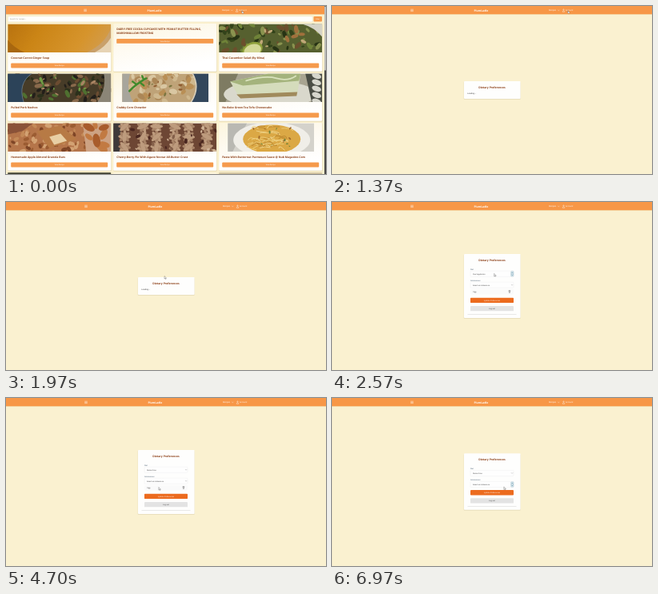
An HTML page for the animation above (8 s loop, 400 by 210 pixels).

```html
<!DOCTYPE html>
<html lang="en">
<head>
<meta charset="utf-8">
<title>Recipe preferences</title>
<style>
html, body { margin: 0; width: 100%; height: 100%; overflow: hidden; background: #faf1d0; }
svg { display: block; }
#stage { width: 100vw; height: 100vh; }
text { font-family: "Noto Sans", "Open Sans", sans-serif; text-rendering: geometricPrecision; }
</style>
</head>
<body>
<svg id="stage" viewBox="0 0 400 210">
  <defs>
    <linearGradient id="card" x1="0" y1="0" x2="0.4" y2="1">
      <stop offset="0" stop-color="#fcf5dd"/><stop offset="0.45" stop-color="#fefaf0"/>
      <stop offset="1" stop-color="#ffffff"/>
    </linearGradient>
    <linearGradient id="soup" x1="0" y1="0" x2="1" y2="0.2">
      <stop offset="0" stop-color="#b8720f"/><stop offset="0.35" stop-color="#cb8516"/>
      <stop offset="0.8" stop-color="#d6942c"/><stop offset="1" stop-color="#d39a45"/>
    </linearGradient>
  </defs>
</svg>
<script>
const LOOP = 8000;
const stage = document.getElementById("stage");

function add(parent, tag, attrs) {
  const node = document.createElementNS("http://www.w3.org/2000/svg", tag);
  for (const k in attrs) node.setAttribute(k, attrs[k]);
  parent.appendChild(node);
  return node;
}
const group = parent => add(parent, "g", {});
const rect = (p, x, y, width, height, fill, rx = 0, more = {}) =>
  add(p, "rect", { x, y, width, height, fill, rx, ...more });
const path = (p, d, stroke, width = 0.4, fill = "none") =>
  add(p, "path", { d, stroke, fill, "stroke-width": width, "stroke-linecap": "round", "stroke-linejoin": "round" });
const shape = (p, d, fill) => path(p, d, "none", 0, fill);
const oval = (p, cx, cy, rx, ry, fill, turn = 0) =>
  add(p, "ellipse", { cx, cy, rx, ry, fill, transform: `rotate(${turn} ${cx} ${cy})` });
function label(p, str, x, y, size, fill, weight = 400, anchor = "start") {
  const t = add(p, "text", { x, y, fill, "font-size": size, "font-weight": weight, "text-anchor": anchor });
  t.textContent = str;
  return t;
}
const show = (node, on) => node.setAttribute("visibility", on ? "inherit" : "hidden");
const move = (node, x, y) => node.setAttribute("transform", `translate(${x} ${y})`);

function random(seed) {
  return () => (seed = (seed * 16807) % 2147483647) / 2147483647;
}

// Loose ovals in a few tones inside the area [x, y, w, h].
function scatter(p, seed, count, tones, size, [x, y, w, h], flat = 0.5) {
  const rnd = random(seed * 7919);
  for (let i = 0; i < count; i++) {
    const r = size * (0.5 + rnd());
    oval(p, x + rnd() * w, y + rnd() * h, r, r * flat, tones[i % tones.length], rnd() * 180);
  }
}

const photos = {
  soup(p) {
    rect(p, 0, 0, 129, 36, "url(#soup)");
    shape(p, "M129 5Q122 25 98 36H129Z", "#c9a06a");
    shape(p, "M129 17Q122 29 108 36H129Z", "#e6d3b4");
    shape(p, "M0 20Q8 30 22 36H0Z", "#a8670f");
  },
  salad(p) {
    rect(p, 0, 0, 129, 36, "#56602f");
    scatter(p, 11, 70, ["#33431a", "#6f8338", "#273314", "#8a934f", "#6b4f2c"], 4, [0, 0, 129, 36]);
    scatter(p, 23, 9, ["#c0a878", "#a0703c"], 4, [50, 4, 62, 26]);
    shape(p, "M104 0H129V16Q119 4 104 0Z", "#d5d3c6");
    oval(p, 42, 32, 13, 9, "#8fa03c", -20);
    oval(p, 42, 33, 11, 7.5, "#d3d796", -20);
  },
  nachos(p) {
    rect(p, 0, 0, 129, 36, "#473c28");
    scatter(p, 5, 90, ["#2b301b", "#6b4c31", "#4f7030", "#231f1a", "#8a6a4c"], 3.4, [0, 0, 129, 36]);
    scatter(p, 17, 16, ["#6f9c45", "#a98563"], 2.6, [28, 2, 84, 30]);
    shape(p, "M0 0H30Q12 12 20 36H0Z", "#2c4359");
    path(p, "M30 0Q12 12 20 36", "#6a7f8c", 0.8);
    shape(p, "M120 0H129V36H112Q124 18 120 0Z", "#8b8577");
  },
  chowder(p) {
    rect(p, 0, 0, 108, 36, "#bfa378");
    scatter(p, 8, 50, ["#cfb88e", "#ab8656", "#d9c7a2", "#b98f55"], 4, [12, 0, 78, 36], 0.65);
    scatter(p, 31, 12, ["#8f5c30", "#7b7540"], 2, [30, 6, 52, 26]);
    shape(p, "M0 0H10Q4 18 14 36H0Z", "#a8a59c");
    shape(p, "M88 0H108V36H86Q98 18 88 0Z", "#33475c");
    path(p, "M88 0Q98 18 86 36", "#d9cfba", 1.6);
    path(p, "M9 22Q16 14 30 6M17 13l-4 -3M22 11l5 4M27 8l-2 -5", "#3f8a2c", 2.4);
  },
  cheesecake(p) {
    rect(p, 0, 0, 129, 36, "#a8a491");
    shape(p, "M0 0H24L8 36H0Z", "#7e7b62");
    oval(p, 64, 26, 58, 17, "#d9d8cc");
    shape(p, "M14 10L62 0H102L98 25L24 27Z", "#d5dcbc");
    shape(p, "M14 10L62 0H102L100 9L30 15Z", "#a4b37c");
    shape(p, "M22 26L98 23L97 28L27 31Z", "#a08a5c");
    path(p, "M34 9Q58 2 72 6T96 3", "#d9e2bd", 1.8);
    shape(p, "M108 0H129V36H116Z", "#4a4d45");
    for (let i = 0; i < 5; i++) oval(p, 122, 3 + i * 8, 6, 3.4, "#d6d6cd", 20);
  },
  granola(p) {
    rect(p, 0, 0, 129, 36, "#b5754a");
    scatter(p, 13, 90, ["#9b5c32", "#c48a58", "#7e4526", "#d3a273"], 3, [0, 0, 100, 36], 0.6);
    shape(p, "M0 0H32L18 10L0 14Z", "#8a5238");
    shape(p, "M36 10L66 3L86 20L52 31Z", "#b77a45");
    shape(p, "M52 17L66 13L74 22L58 27Z", "#e8cfa4");
    shape(p, "M94 0H129V36H98Z", "#cda283");
    scatter(p, 19, 10, ["#a85c2c", "#c27a42"], 6, [92, 2, 34, 32], 0.55);
  },
  pie(p) {
    rect(p, 0, 0, 129, 36, "#6d4634");
    shape(p, "M0 0H16Q2 16 10 36H0Z", "#3e3a3a");
    for (let i = 0; i < 18; i++) {
      const x = 14 + (i % 6) * 20 + (i % 2) * 3, y = 4 + Math.floor(i / 6) * 13;
      for (let k = 0; k < 4; k++) oval(p, x, y, 8, 2.6, k % 2 ? "#bd9b7d" : "#a88468", k * 45 + i * 23);
    }
    scatter(p, 9, 26, ["#4a2720", "#84604a", "#d0b498"], 2.4, [8, 0, 121, 36], 0.6);
  },
  pasta(p) {
    rect(p, 0, 0, 108, 36, "#d4d2cb");
    shape(p, "M0 0H24L6 36H0Z", "#b9b8b2");
    oval(p, 55, 21, 48, 22, "#f0eee8");
    oval(p, 55, 20, 36, 18, "#dba845");
    const rnd = random(7777);
    for (let i = 0; i < 46; i++) {
      const x = 24 + rnd() * 46, y = 5 + rnd() * 27;
      path(p, `M${x} ${y}q${rnd() * 10} ${rnd() * 10 - 8} ${6 + rnd() * 8} ${rnd() * 6 - 3}`,
        ["#eccb76", "#bf8a30", "#f0d58c"][i % 3], 1);
    }
    scatter(p, 3, 16, ["#6f8238", "#a06a2a"], 1.5, [30, 5, 50, 26]);
  }
};

const BROWN = "#8b3d14", ORANGE = "#f59a4c";

// ---- recipe list ----
const list = group(stage);
rect(list, 0, 0, 400, 210, "#faf0cd");
rect(list, 2.5, 13, 380.5, 6.8, "#fffefa", 1, { stroke: "#e6dfca", "stroke-width": 0.3 });
label(list, "Search for recipes...", 5, 17.2, 2.2, "#8d8a84");
rect(list, 384.5, 13, 10.5, 6.4, ORANGE, 1);
label(list, "Filter", 389.7, 17, 2.1, "#fff", 400, "middle");

// title, photo, photo offset, photo width
const cards = [
  ["Coconut Carrot-Ginger Soup", "soup", 0, 129],
  ["DAIRY-FREE COCOA CUPCAKES WITH PEANUT BUTTER FILLING,|MARSHMALLOW FROSTING"],
  ["Thai Cucumber Salad (By Mina)", "salad", 0, 129],
  ["Pulled Pork Nachos", "nachos", 0, 129],
  ["Crabby Corn Chowder", "chowder", 11, 108],
  ["No-Bake Green Tea Tofu Cheesecake", "cheesecake", 0, 129],
  ["Homemade Apple Almond Granola Bars", "granola", 0, 129],
  ["Cherry-Berry Pie With Agave Nectar All-Butter Crust", "pie", 0, 129],
  ["Pasta With Butternut Parmesan Sauce @ Nub Magazine.Com", "pasta", 11, 108]
];
cards.forEach(([title, photo, dx, w], i) => {
  const x = 2.2 + (i % 3) * 132, y = 22 + Math.floor(i / 3) * 62;
  rect(list, x + 0.2, y + 0.6, 129.2, 60, "#e3d6ae", 1.2);
  rect(list, x, y, 129, 59.8, "url(#card)", 1.2);
  if (photo) photos[photo](add(list, "svg", { x: x + dx, y: y + 0.4, width: w, height: 35.6, overflow: "hidden" }));
  const top = photo ? y + 44 : y + 7.7;
  const lines = title.split("|");
  lines.forEach((s, n) => label(list, s, x + 4, top + n * 5.5, 3.45, BROWN, 700));
  const by = photo ? y + 49.6 : y + 19;
  rect(list, x + 4, by, 121, 5.8, ORANGE, 0.9);
  label(list, "View Recipe", x + 64.5, by + 3.7, 2.15, "#fff", 500, "middle");
});
["#3f4030", "#fcf5dd", "#cdbf9c"].forEach((c, i) => rect(list, 2.2 + i * 132, 208.3, 129, 2, c, 0.5));

// ---- preferences page ----
const page = group(stage);
rect(page, 0, 0, 400, 210, "#faf1d0");

function panel(p, y, h) {
  rect(p, 164.6, y + 0.7, 71.2, h + 0.3, "#e9dfbd", 1.2);
  rect(p, 165, y, 70.6, h, "#fefefd", 1);
}
const heading = (p, y) => label(p, "Dietary Preferences", 200, y, 3.4, BROWN, 700, "middle");

const loading = group(page);
panel(loading, 94, 22);
heading(loading, 102.5);
label(loading, "Loading...", 169.3, 110.4, 2.3, "#222");

function selectBox(p, y, value) {
  rect(p, 173, y - 3.6, 54, 7.2, "#fefefe", 0.8, { stroke: "#ebebeb", "stroke-width": 0.35 });
  const text = label(p, value, 176, y + 0.8, 2.15, "#333");
  const arrow = path(p, `M224.3 ${y - 0.4}l0.8 0.8l0.8 -0.8`, "#666", 0.3);
  const spin = group(p);
  rect(spin, 223.7, y - 3.2, 3.2, 6.4, "#d8e6ec", 0.5, { stroke: "#7fa9bb", "stroke-width": 0.3 });
  path(spin, `M224.5 ${y - 0.9}l0.8 -0.9l0.8 0.9M224.5 ${y + 0.9}l0.8 0.9l0.8 -0.9`, "#35748e", 0.45);
  return { text, hover(on) { show(arrow, !on); show(spin, on); } };
}

function buildForm(withItem) {
  const g = group(page);
  const y = withItem ? 65 : 69.2;
  const drop = withItem ? 54.7 : 45.8;
  panel(g, y, withItem ? 80 : 70.6);
  heading(g, y + 8.7);
  label(g, "Diet", 173, y + 20, 2.15, "#3d5468", 500);
  const diet = selectBox(g, y + 24.8, "Ovo Vegetarian");
  label(g, "Intolerances", 173, y + 33.8, 2.15, "#3d5468", 500);
  const food = selectBox(g, y + 38.8, "Select an intolerance");
  if (withItem) {
    rect(g, 173, y + 44.2, 54, 6.4, "#fafafa", 0.7);
    label(g, "Egg", 176.5, y + 48, 2.2, "#333");
    path(g, `M220.9 ${y + 46}h2M221.2 ${y + 46.3}l0.2 2.2h1l0.2 -2.2M221.6 ${y + 45.6}h0.6`, "#555", 0.4);
  }
  rect(g, 173, y + drop, 54, 6.4, "#ec6b1e", 0.9);
  label(g, "Update Preferences", 200, y + drop + 4, 2.2, "#fff", 500, "middle");
  rect(g, 173, y + drop + 10.3, 54, 6.3, "#e3e3e3", 0.9);
  label(g, "Log out", 200, y + drop + 14.2, 2.2, "#444", 400, "middle");
  rect(g, 169.5, y + drop + 20.4, 61, 0.5, "#d3d3d1");
  return { g, diet, food };
}
const full = buildForm(true), short = buildForm(false);
short.diet.text.textContent = "Gluten Free";
short.diet.hover(false);
full.food.hover(false);

// ---- header ----
const header = group(stage);
rect(header, 0, 0, 400, 10.4, "#f79747");
rect(header, 0, 10.4, 400, 0.5, "#efd09c");
const nav = group(header);
path(nav, "M98.6 4.2h2.8M98.6 5.4h2.8M98.6 6.6h2.8", "#fff", 0.45);
label(nav, "PlumLadle", 186.4, 6.7, 3.4, "#fff", 700, "middle");
label(nav, "Recipes", 271, 6.3, 2.6, "#fff");
path(nav, "M282.4 5l0.9 0.9l0.9 -0.9", "#fff", 0.35);
add(nav, "circle", { cx: 289.5, cy: 4.6, r: 0.7, fill: "none", stroke: "#fff", "stroke-width": 0.4 });
path(nav, "M288.2 7q0 -1.4 1.3 -1.4t1.3 1.4z", "#fff", 0.35);
label(nav, "Account", 292, 6.3, 2.5, "#fff");

const scrollbar = group(header);
rect(scrollbar, 398, 0, 2, 210, "#4a4a48");
rect(scrollbar, 398, 0.5, 2, 80, "#bdbdba", 0.6);

// ---- pointer ----
const pointer = group(stage);
const arrow = path(pointer, "M0 0L0 3.1L0.8 2.4L1.3 3.5L1.8 3.3L1.3 2.2L2.3 2.2Z", "#333", 0.3, "#fff");
const hand = path(pointer, "M0 0.2q0.4 -0.5 0.7 0v1.3l1.3 0.3q0.4 0.1 0.3 0.6l-0.3 1.3h-1.5l-1 -1.6q0 -0.4 0.5 -0.1Z", "#333", 0.3, "#fff");

// time, x, y
const track = [
  [0, 294.8, 5.6], [1370, 294.8, 5.6], [1600, 294.8, 6.2], [1970, 198, 93],
  [2370, 204, 111], [2570, 202.6, 89.8], [2800, 202.6, 89.8], [3030, 201, 99],
  [3230, 201, 99], [3400, 199, 128], [4170, 193, 92], [4700, 190.8, 112],
  [5300, 190.8, 112], [5700, 221.4, 111.2], [6170, 221.4, 111.2],
  [6600, 216, 107], [6970, 214.8, 111.4], [LOOP, 214.8, 111.4]
];
function pointerAt(t) {
  const i = track.findIndex((k, n) => n && t < k[0]);
  const [t0, x0, y0] = track[i - 1], [t1, x1, y1] = track[i];
  const u = (t - t0) / (t1 - t0), e = u * u * (3 - 2 * u);
  return [x0 + (x1 - x0) * e, y0 + (y1 - y0) * e];
}

const T = { page: 1370, form: 2200, choose: 4200, remove: 5900 };

function draw(t) {
  const onList = t < T.page;
  show(list, onList);
  show(scrollbar, onList);
  show(page, !onList);
  move(nav, onList ? -0.9 : 0, 0);

  show(loading, t < T.form && !onList);
  show(full.g, t >= T.form && t < T.remove);
  show(short.g, t >= T.remove);
  full.diet.text.textContent = t < T.choose ? "Ovo Vegetarian" : "Gluten Free";
  full.diet.hover(t >= 2500 && t < T.choose);
  short.food.hover(t >= 6500);

  const onLink = t < 1640 || (t >= 5650 && t < T.remove);
  move(pointer, ...pointerAt(t));
  show(pointer, t < 3400 || t >= 4170);
  show(hand, onLink);
  show(arrow, !onLink);
}

const start = performance.now();
function tick() {
  draw((performance.now() - start) % LOOP);
  requestAnimationFrame(tick);
}
tick();
</script>
</body>
</html>
```
